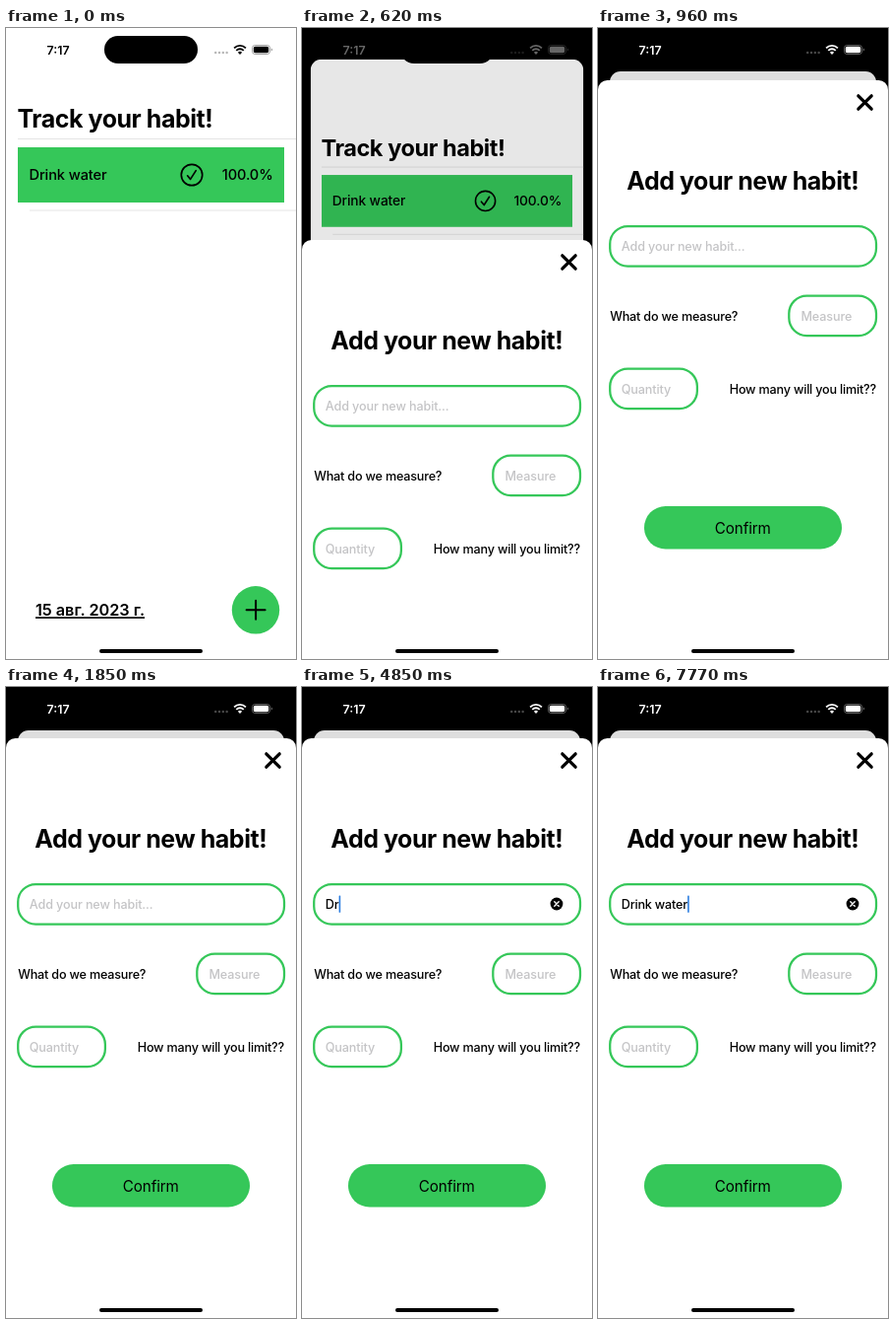
Animation of 295x640 px, one loop 8000 ms. Source, as an HTML page:

```html
<!DOCTYPE html>
<html lang="en">
<head>
<meta charset="utf-8">
<title>Habit tracker</title>
<style>
  html, body { margin: 0; width: 100%; height: 100%; overflow: hidden; background: #000; }
  svg { display: block; width: 100vw; height: 100vh; }
  text { font: 550 12.6px Inter, "Open Sans", sans-serif; letter-spacing: -.19px; white-space: pre; }
  .title { font-size: 25px; font-weight: 700; letter-spacing: -.46px; }
  .row { font-size: 14.6px; letter-spacing: -.1px; }
  .date { font-size: 16.3px; font-weight: 600; letter-spacing: -.05px; }
  .clock { font-size: 12.4px; font-weight: 600; letter-spacing: 0; }
  .button { font-size: 15.2px; font-weight: 400; letter-spacing: -.1px; }
  .menu { font-size: 10.9px; font-weight: 400; letter-spacing: 0; }
  .hint { fill: #c4c4c6; letter-spacing: -.12px; }
  .mid { text-anchor: middle; }
  .end { text-anchor: end; }
  .green { fill: #35c759; }
  .field { fill: #fff; stroke: #35c759; stroke-width: 2.25; }
  .line { fill: none; stroke: #000; stroke-linecap: round; stroke-linejoin: round; }
  .rule { stroke: #dedede; stroke-width: .8; }
</style>
</head>
<body>
<svg viewBox="0 0 295 640" preserveAspectRatio="none">
  <defs>
    <filter id="soft" x="-30%" y="-60%" width="160%" height="240%">
      <feDropShadow dx="0" dy="2" stdDeviation="5" flood-color="#000" flood-opacity=".24"/>
    </filter>
    <clipPath id="cardClip"><rect id="cardShape" width="295" height="700"/></clipPath>
  </defs>
  <rect width="295" height="640"/>

  <!-- habit list -->
  <g id="card">
    <g clip-path="url(#cardClip)">
      <rect width="295" height="700" fill="#fff"/>
      <g id="list">
        <text class="title" x="11.5" y="101">Track your habit!</text>
        <path class="rule" d="M12 112.5H295M24 185H295"/>
        <rect class="green" x="12" y="121" width="271" height="56"/>
        <text class="row" x="23.5" y="154.3">Drink water</text>
        <circle class="line" cx="189" cy="149" r="10.7" stroke-width="1.7"/>
        <path class="line" d="M184.6 149.8l3 3.6 5.6-8.8" stroke-width="1.7"/>
        <text class="row end" x="271.6" y="154.3">100.0%</text>
        <text class="date" x="30" y="596.3" text-decoration="underline">15 авг. 2023 г.</text>
        <circle class="green" cx="254" cy="590.3" r="24.2"/>
        <path class="line" d="M244.6 590.3h19M254.1 580.8v19" stroke-width="2"/>
      </g>
      <rect id="dim" width="295" height="700"/>
    </g>
  </g>

  <!-- status bar -->
  <rect x="100" y="8" width="95" height="28" rx="14"/>
  <g id="status">
    <text class="clock" x="41.6" y="26.5">7:17</text>
    <g id="dots" opacity=".28"></g>
    <path d="M232.1 20.4a8.3 8.3 0 0 1 11.8 0M234.3 22.8a5.2 5.2 0 0 1 7.4 0" fill="none" stroke="currentColor" stroke-width="1.8"/>
    <path d="M238 27l-2.1-2.2a3 3 0 0 1 4.2 0z"/>
    <rect x="250.5" y="17.5" width="18" height="9" rx="2.8" fill="none" stroke="currentColor" stroke-width=".8" opacity=".45"/>
    <rect x="251.8" y="18.8" width="15.4" height="6.4" rx="1.7"/>
    <path d="M269.8 20.5a1.6 1.6 0 0 1 0 3z" opacity=".5"/>
  </g>

  <!-- new habit sheet, laid out at its resting place -->
  <g id="sheet">
    <rect y="52" width="295" height="700" rx="9.5" fill="#fff"/>
    <path class="line" d="M264.8 67.8l13.4 13.4m0-13.4l-13.4 13.4" stroke-width="3.2"/>
    <text class="title mid" x="147.2" y="163">Add your new habit!</text>
    <rect class="field" x="12.2" y="200" width="270.8" height="40.5" rx="18"/>
    <text id="empty" class="hint" x="23.8" y="224.7">Add your new habit...</text>
    <text id="typed" x="23.8" y="224.7"></text>
    <g id="clear">
      <circle cx="259" cy="220" r="6.4"/>
      <path d="M256.8 217.8l4.4 4.4m0-4.4l-4.4 4.4" stroke="#fff" stroke-width="1.4" stroke-linecap="round"/>
    </g>
    <rect id="caret" y="211.5" width="1.6" height="17.3" rx=".6" fill="#2b7de0"/>
    <text x="12.3" y="295.5">What do we measure?</text>
    <rect class="field" x="194.3" y="270.6" width="88.7" height="40.5" rx="18"/>
    <text class="hint" x="206.5" y="295.5">Measure</text>
    <rect class="field" x="12.2" y="344.6" width="88.7" height="40.5" rx="18"/>
    <text class="hint" x="23.8" y="369.5">Quantity</text>
    <text class="end" x="283" y="369.5">How many will you limit??</text>
    <rect class="green" x="47" y="484" width="201" height="43.5" rx="21.75"/>
    <text class="button mid" x="147.3" y="511.5">Confirm</text>
    <g id="menu">
      <path filter="url(#soft)" fill="#f9f9f9" d="M21 171H94a9 9 0 0 1 9 9V192a9 9 0 0 1-9 9H39.5L34 206.2q-1.5 1.3-3 0L25.5 201H21a9 9 0 0 1-9-9V180a9 9 0 0 1 9-9z"/>
      <path d="M64.8 171v30" stroke="#dcdcdc" stroke-width=".8"/>
      <text class="menu" x="23.8" y="190">Paste</text>
      <path class="line" stroke-width="1.1" d="M78.5 184v-1.5q0-2 2-2H82M86 180.5h1.5q2 0 2 2V184M89.5 188v1.5q0 2-2 2H86M82 191.5h-1.5q-2 0-2-2V188M81.3 183.8h5.4M81.3 186h5.4M81.3 188.2h3.5"/>
    </g>
  </g>
  <rect x="95" y="630" width="105" height="4" rx="2"/>
</svg>
<script>
  const LOOP = 8000;
  const WORD = "Drink water";
  const RISE = 588, SPRING = 0.019, OPEN_AT = 486;

  // [time, value]: each value holds until the next step
  const OPEN_TICKS = [500, 620, 720, 850, 960, 1850].map(t => [t, t]);
  const LETTERS = [[3580, 1], [4850, 2], [5100, 4], [5320, 5], [6240, 6],
                   [6740, 7], [6950, 8], [7450, 9], [7630, 10], [7770, 11]];
  const CARET = [[2670, .5], [2790, 1], [4520, .5], [4630, 0], [4740, .5], [4850, 1],
                 [5830, .5], [5950, 0], [6090, .6], [6240, 1]];
  const MENU = [[3030, .2], [3140, .55], [3250, .85], [3370, 1], [3580, .4], [3690, 0]];

  const $ = id => document.getElementById(id);
  const set = (id, attrs) => {
    for (const k in attrs) $(id).setAttribute(k, attrs[k]);
  };
  const clamp = v => Math.min(1, Math.max(0, v));
  const hold = (steps, t) => steps.reduce((v, [at, next]) => t >= at ? next : v, 0);

  $("dots").innerHTML = [0, 1, 2, 3]
    .map(i => `<circle cx="${213.2 + i * 3.8}" cy="25" r="1.25"/>`).join("");

  const pen = document.createElement("canvas").getContext("2d");
  function textWidth(s) {
    pen.font = '550 12.6px Inter, "Open Sans", sans-serif';
    return pen.measureText(s).width - s.length * .19;
  }

  // Critically damped rise from 0 to 1
  function progress(t) {
    if (t < OPEN_AT) return 0;
    const x = (t - OPEN_AT) * SPRING;
    return 1 - (1 + x) * Math.exp(-x);
  }

  function drawOpening(t) {
    const p = progress(t);
    const scale = 1 - .0814 * p;
    const tone = Math.round(255 * clamp((t - 520) / 250));
    const color = `rgb(${tone},${tone},${tone})`;
    set("card", { transform: `translate(${12 * p} ${44 * p}) scale(${scale})` });
    set("cardShape", { rx: 12 * clamp(p * 1.5) });
    set("list", { transform: `translate(0 ${5 * p})` });
    set("dim", { opacity: .13 * p });
    set("status", { fill: color, color });
    set("sheet", {
      transform: `translate(0 ${Math.round(RISE * (1 - p))})`,
      visibility: p > 0 ? "visible" : "hidden"
    });
  }

  function drawField(t) {
    const value = WORD.slice(0, hold(LETTERS, t));
    $("typed").textContent = value;
    set("empty", { opacity: value ? 0 : 1 });
    set("clear", { opacity: value ? 1 : 0 });
    set("caret", { x: 24 + textWidth(value), opacity: hold(CARET, t) });
    set("menu", { opacity: hold(MENU, t) });
  }

  const start = performance.now();
  function frame(now) {
    const t = Math.max(0, now - start) % LOOP;
    drawOpening(hold(OPEN_TICKS, t));
    drawField(t);
    requestAnimationFrame(frame);
  }
  frame(start);
</script>
</body>
</html>
```
